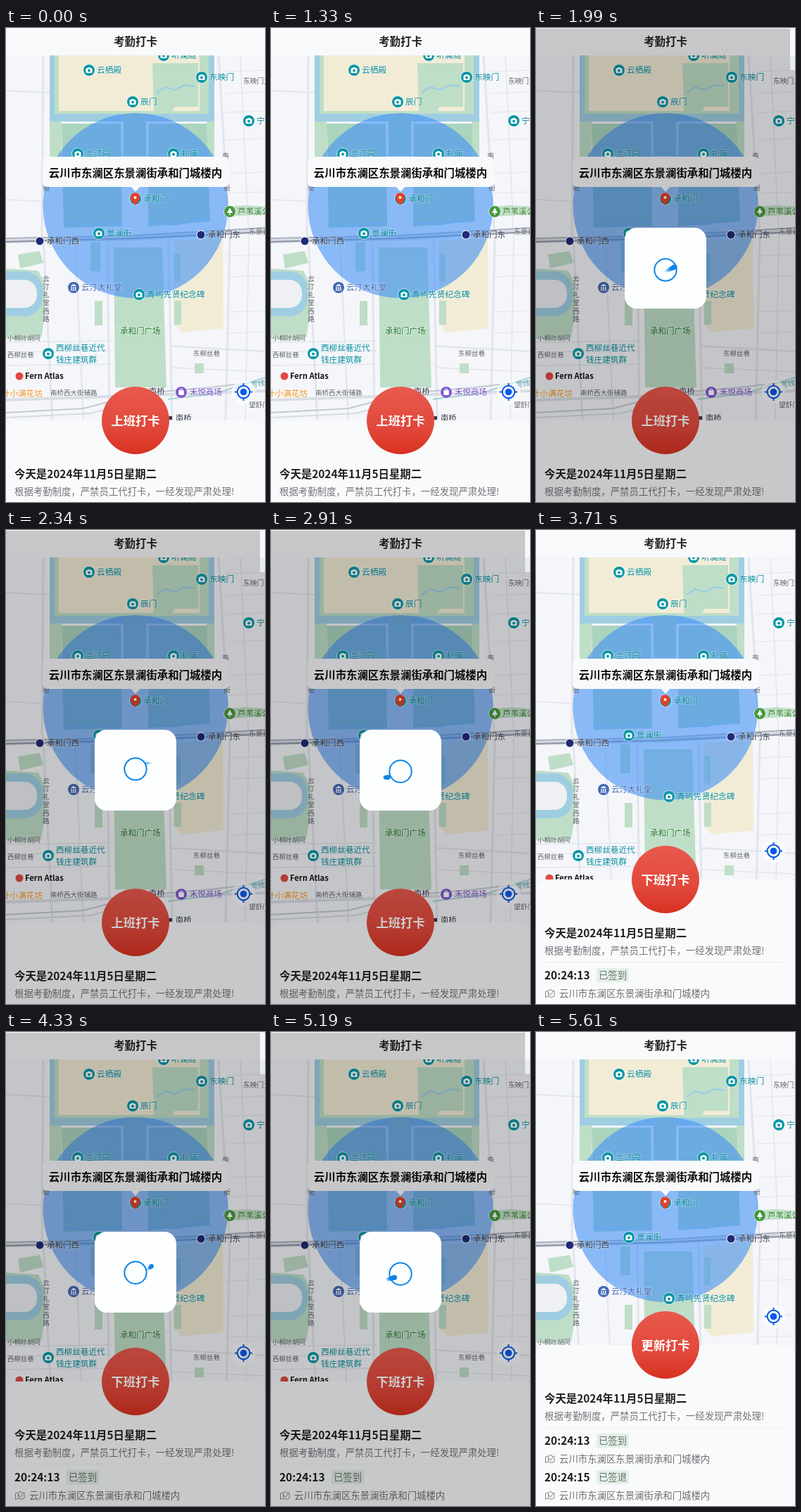
These frames come from a looping animation (368 px wide and 674 px high, 5.63 s). An HTML page with a canvas:

```html
<!DOCTYPE html>
<html lang="zh-CN">
<head>
<meta charset="utf-8">
<title>考勤打卡</title>
<style>
html, body { margin: 0; width: 100%; height: 100%; overflow: hidden; background: #f8f9fb; }
canvas { display: block; width: 368px; height: 674px; }
</style>
</head>
<body>
<canvas id="stage"></canvas>
<script>
const W = 368, H = 674, LOOP = 5630;
const canvas = document.getElementById('stage');
const ctx = canvas.getContext('2d');
const dpr = window.devicePixelRatio || 1;
canvas.width = W * dpr;
canvas.height = H * dpr;

const FONT = '"Noto Sans CJK SC", "Noto Sans CJK", "Noto Sans", sans-serif';
const ADDRESS = '云川市东澜区东景澜街承和门城楼内';
const TEAL = '#078c9c', GREEN = '#bfdec7', PARK = '#abd4bf', SAND = '#f2ecd6', WATER = '#9fcee2';
const ROAD = '#e2e5ec', GREY = '#5c6169';

// Each phase: start time, top edge of the sheet, button caption
const PHASES = [
  { at: 0, top: 558, label: '上班打卡' },
  { at: 2970, top: 497, label: '下班打卡' },
  { at: 5300, top: 445, label: '更新打卡' }
];
const RECORDS = [['20:24:13', '已签到'], ['20:24:15', '已签退']];
// Loading dialogs, with the comet's starting angle in degrees
const LOADS = [{ from: 1700, to: 2970, angle: 147 }, { from: 4330, to: 5300, angle: 14 }];

function rect(x0, y0, x1, y1, fill) {
  ctx.fillStyle = fill;
  ctx.fillRect(x0, y0, x1 - x0, y1 - y0);
}
function round(x, y, w, h, r, fill) {
  ctx.beginPath();
  ctx.roundRect(x, y, w, h, r);
  ctx.fillStyle = fill;
  ctx.fill();
}
function disc(x, y, r, fill) {
  ctx.beginPath();
  ctx.arc(x, y, r, 0, Math.PI * 2);
  ctx.fillStyle = fill;
  ctx.fill();
}
function ring(x, y, r, width, color) {
  ctx.beginPath();
  ctx.arc(x, y, r, 0, Math.PI * 2);
  ctx.strokeStyle = color;
  ctx.lineWidth = width;
  ctx.stroke();
}
function path(pts) {
  ctx.beginPath();
  for (let i = 0; i < pts.length; i += 2) ctx.lineTo(pts[i], pts[i + 1]);
}
function area(fill, ...pts) {
  path(pts);
  ctx.fillStyle = fill;
  ctx.fill();
}
function line(color, width, ...pts) {
  path(pts);
  ctx.strokeStyle = color;
  ctx.lineWidth = width;
  ctx.stroke();
}
function text(s, x, y, size, color, { weight = 400, align = 'left', halo = false } = {}) {
  ctx.font = `${weight} ${size}px ${FONT}`;
  ctx.textAlign = align;
  ctx.textBaseline = 'middle';
  if (halo) {
    ctx.strokeStyle = 'rgba(255,255,255,.3)';
    ctx.lineWidth = 2;
    ctx.lineJoin = 'round';
    ctx.strokeText(s, x, y);
  }
  ctx.fillStyle = color;
  ctx.fillText(s, x, y);
}
function column(s, x, y, step) {
  [...s].forEach((c, i) => text(c, x, y + i * step, 9.5, GREY, { align: 'center' }));
}

function badge(x, y, color) {
  disc(x, y, 9, 'rgba(255,255,255,.6)');
  disc(x, y, 8, color);
}
function sight(x, y, name) {
  badge(x, y, '#0a97a6');
  rect(x - 1.8, y - 4, x + 1.8, y - 2, '#fff');
  round(x - 4.5, y - 3, 9, 7, 1.5, '#fff');
  disc(x, y + .5, 2, '#0a97a6');
  text(name, x + 11, y, 11.8, TEAL, { weight: 500, halo: true });
}
function station(x, y, name) {
  disc(x, y, 6.5, '#fff');
  disc(x, y, 5.5, '#202a76');
  text(name, x + 10, y, 11.5, '#343a48', { weight: 500, halo: true });
}

function drawStreets() {
  line(ROAD, 2, 0, 89, 62, 92);
  line(ROAD, 1.5, 0, 244, 62, 247);
  line(ROAD, 3, 53, 39, 51, 300);
  line(ROAD, 3, 53, 300, 66, 558);
  line(ROAD, 2, 98, 300, 110, 558);
  line(ROAD, 3, 144, 300, 147, 558);
  line(ROAD, 3, 231, 300, 236, 558);
  line(ROAD, 3, 302, 39, 318, 300, 312, 558);
  line(ROAD, 1.5, 333, 39, 345, 300, 340, 558);
  for (const y of [60, 91, 118, 157, 205, 233, 322, 352, 402, 432]) line(ROAD, 1, 312, y + 2, W, y);
  for (const y of [445, 459, 478]) line(ROAD, 1.5, 0, y + 2, 150, y);
  line(ROAD, 2.5, 232, 452, W, 460);
  line(ROAD, 1.5, 236, 483, W, 489);
  line('#d9dde5', 4, 0, 529, 150, 524, W, 516);
}

function drawLand() {
  // Palace grounds inside the moat
  rect(62, 39, 296, 133, WATER);
  rect(69, 39, 288, 122, GREEN);
  rect(75, 39, 275, 118, SAND);
  area(GREEN, 208, 50, 273, 50, 273, 112, 240, 112, 236, 118, 210, 118);
  line(WATER, 2.5, 214, 92, 226, 84, 240, 88, 254, 81, 268, 83);

  // Twin parks, each with a canal along its foot
  rect(62, 133, 79, 185, GREEN);
  rect(285, 133, 296, 185, GREEN);
  area(PARK, 79, 136, 163, 136, 165, 282, 82, 284);
  area(PARK, 203, 136, 285, 136, 290, 275, 202, 282);
  rect(167, 122, 199, 182, PARK);
  line(WATER, 3, 81, 278, 120, 280, 165, 277);
  line(WATER, 3, 202, 277, 240, 279, 290, 270);

  // Central square
  area(GREEN, 153, 312, 222, 312, 228, 511, 155, 511);
  rect(120, 305, 134, 346, GREEN);
  rect(126, 388, 137, 423, GREEN);
  area(SAND, 238, 303, 308, 298, 309, 427, 250, 433, 238, 420);
  rect(239, 321, 248, 360, GREEN);
  rect(239, 388, 249, 422, GREEN);
  rect(268, 477, 281, 491, GREEN);
  line('#d4e9d8', 1, 156, 426, 227, 426);

  // Theatre lake
  area(GREEN, 17, 322, 48, 317, 53, 334, 20, 342);
  area(GREEN, 0, 342, 46, 345, 56, 365, 55, 410, 50, 440, 25, 445, 0, 441);
  round(-30, 346, 82, 64, 26, WATER);
  round(-30, 358, 74, 40, 18, '#eef0f4');

  area(GREEN, 316, 254, 340, 252, W, 254, W, 265, 316, 268);
}

function drawMap(top) {
  rect(0, 39, W, H, '#f5f6fa');
  ctx.save();
  ctx.beginPath();
  ctx.rect(0, 39, W, top - 39);
  ctx.clip();
  drawStreets();
  drawLand();

  // Avenue, metro and railway
  line('#d5d9e2', 8, 0, 302, 184, 298, W, 287);
  line('#a4abba', 1.5, 0, 299, 184, 295, W, 284);
  line('#8d93a5', 2, 0, 304, 184, 299, W, 290);
  line('#c3c9d2', 2, 0, 547, 110, 541, 190, 520, 290, 511, W, 502);
  line('#d6dae1', 2, 0, 554, 120, 548, 190, 530);
  line('#a4d3d7', 2, 230, 528, 300, 519, W, 497);

  disc(184, 252.5, 131.5, 'rgba(66,145,245,.6)');
  drawLabels();
  ctx.restore();
}

function drawLabels() {
  const small = { halo: true };
  sight(118, 60, '云栖殿');
  sight(224, 39, '听澜阁');
  sight(278, 70, '东映门');
  sight(180, 105, '辰门');
  sight(345, 132, '宁和寺');
  sight(102, 179, '兰汀园');
  sight(238, 179, '礼庙');
  sight(184, 243, '承和门');
  sight(132, 292, '景澜街');
  sight(189, 379, '青屿先贤纪念碑');
  sight(60, 463, '');
  text('西柳丝巷近代', 71, 455, 11.6, TEAL, { weight: 500, halo: true });
  text('钱庄建筑群', 71, 471.5, 11.6, TEAL, { weight: 500, halo: true });
  station(48, 303, '承和门西');
  station(277, 294, '承和门东');

  badge(96, 369, '#4467b5');
  area('#fff', 91.5, 367, 96, 364, 100.5, 367);
  for (const x of [92.5, 95.3, 98]) rect(x, 368, x + 1.4, 372, '#fff');
  rect(91.5, 372.5, 100.5, 373.5, '#fff');
  text('云汀大礼堂', 107, 369, 11.5, '#4467b5', { weight: 500, halo: true });

  badge(318, 261, '#479a3f');
  area('#fff', 318, 255.5, 322, 263, 314, 263);
  rect(317.3, 262, 318.7, 266, '#fff');
  text('芦苇溪公园', 329, 261, 11.5, '#38852f', { weight: 500, halo: true });
  text('承和门广场', 162, 431, 11.5, '#277b32', { weight: 500, halo: true });

  badge(249, 518, '#8059cf');
  round(245.2, 515, 7.6, 7, 1, '#fff');
  ctx.beginPath();
  ctx.arc(249, 515, 2, Math.PI, 0);
  ctx.strokeStyle = '#fff';
  ctx.lineWidth = 1;
  ctx.stroke();
  text('禾悦商场', 261, 518, 11.5, '#7650c5', { weight: 500, halo: true });
  text('叶小满花坊', -6, 519.5, 11.6, '#ef9422', { weight: 500, halo: true });

  text('东映门大街', 337, 75, 9.8, GREY, small);
  text('东景澜街', 345, 289, 9.8, GREY, small);
  text('小桐叶胡同', 2, 440, 9.4, GREY, small);
  text('西柳丝巷', 2, 464, 9.4, GREY, small);
  text('东柳丝巷', 266, 462, 9.5, GREY, small);
  text('南桥西大街辅路', 63, 518, 9.5, GREY, small);
  text('南桥', 203, 517, 11.3, '#343a48', small);
  text('南桥', 241, 555, 11.3, '#343a48', small);
  rect(231, 552, 236, 557, '#343a48');
  text('望舒门', 345, 535, 9.6, GREY, small);
  column('云汀礼堂西路', 57, 356, 11.5);
  column('街', 57, 227, 11);
  column('南', 312, 181, 11);
  column('街', 314, 227, 11);
  ctx.save();
  ctx.translate(348, 508);
  ctx.rotate(-.2);
  text('号线', 0, 0, 10, '#55a9ae');
  ctx.restore();

  disc(19, 495, 5.5, '#e04a43');
  text('Fern Atlas', 27, 495, 11.2, '#111', { weight: 700, halo: true });
}

function drawPopup() {
  round(52, 183, 265, 43, 7, '#f8f9fb');
  area('#f8f9fb', 177, 225, 191, 225, 184, 233);
  ctx.beginPath();
  ctx.arc(183.5, 241, 6.8, Math.PI * .86, Math.PI * .14);
  ctx.quadraticCurveTo(188, 248, 183.5, 252);
  ctx.quadraticCurveTo(179, 248, 177, 243.8);
  ctx.fillStyle = '#e4402b';
  ctx.fill();
  disc(183.5, 241, 2, '#fff');
  text(ADDRESS, 184, 206, 15.4, '#0c0c0c', { weight: 700, align: 'center' });
}

function drawLocate(y) {
  const x = 337.5, blue = '#0a59e8';
  disc(x, y, 17, 'rgba(255,255,255,.6)');
  ring(x, y, 8.8, 2, blue);
  disc(x, y, 4.8, blue);
  for (const [dx, dy] of [[1, 0], [-1, 0], [0, 1], [0, -1]])
    line(blue, 2, x + dx * 9, y + dy * 9, x + dx * 12.5, y + dy * 12.5);
}

function drawRecord([time, state], y) {
  text(time, 12, y, 15.4, '#1c1c1e', { weight: 700 });
  rect(86, y - 10, 132, y + 10, '#e3f0e7');
  text(state, 109, y, 13.4, '#6d7370', { align: 'center' });
  const c = '#85878b', p = y + 26;
  line(c, 1, 17, p - 4, 13.5, p - 3, 13.5, p + 5.5, 17.5, p + 4, 22, p + 5.5, 26, p + 4, 26, p - 4, 24, p - 3.5);
  line(c, 1, 17.5, p - 3, 17.5, p + 4);
  ctx.beginPath();
  ctx.arc(20.5, p - 2.5, 3, Math.PI * .8, Math.PI * .2);
  ctx.lineTo(20.5, p + 2.5);
  ctx.closePath();
  ctx.stroke();
  text(ADDRESS, 33, p, 13.4, '#6f7175');
}

function drawSheet(phase, count) {
  const top = phase.top;
  round(0, top, W, H, [18, 18, 0, 0], '#f9fafb');
  const g = ctx.createLinearGradient(0, top - 48, 0, top + 48);
  g.addColorStop(0, '#e9594d');
  g.addColorStop(.6, '#e1493c');
  g.addColorStop(1, '#d83120');
  disc(184, top, 48, g);
  text(phase.label, 184, top, 17.3, '#fff', { weight: 700, align: 'center' });
  text('今天是2024年11月5日星期二', 12, top + 76, 15.4, '#1f2022', { weight: 700 });
  text('根据考勤制度，严禁员工代打卡，一经发现严肃处理!', 12, top + 101, 13.4, '#737579');
  if (count) rect(12, top + 117, 352, top + 118, '#eeeff1');
  for (let i = 0; i < count; i++) drawRecord(RECORDS[i], top + 136 + i * 52);
}

// Point on the comet's tilted orbit
function orbit(a) {
  const tilt = -.4, u = 25 * Math.cos(a), v = 4 * Math.sin(a);
  return [184 + u * Math.cos(tilt) - v * Math.sin(tilt), 341.5 + u * Math.sin(tilt) + v * Math.cos(tilt)];
}
function drawComet(a) {
  const near = Math.sin(a) > -.1, depth = (1 + Math.sin(a)) / 2;
  for (let i = 14; i >= 0; i--) {
    const k = 1 - i / 15;
    const [x, y] = orbit(a + i * .05);
    ctx.globalAlpha = near ? k * k : k * k * .22;
    disc(x, y, (1.9 + 1.8 * depth) * (.55 + .45 * k), '#0a84e8');
  }
  ctx.globalAlpha = 1;
}
function drawLoading(load, t) {
  rect(0, 1, W, H, 'rgba(0,0,0,.2)');
  rect(361, 0, W, 39, '#f7f8fa');
  rect(361, 39, W, 60, '#e6ebf4');
  round(126, 284, 116, 115, 17, '#fdfefe');
  const a = (load.angle - (t - load.from) * .3) * Math.PI / 180;
  const near = Math.sin(a) > 0;
  if (!near) drawComet(a);
  ring(184, 341.7 + 2.6 * Math.sin(a), 15.7, 2, '#0a84e8');
  if (near) drawComet(a);
}

function draw(t) {
  const n = PHASES.filter(p => t >= p.at).length - 1;
  const phase = PHASES[n];
  ctx.setTransform(dpr, 0, 0, dpr, 0, 0);
  drawMap(phase.top);
  rect(0, 0, W, 39, '#f8f9fb');
  text('考勤打卡', 184, 19.5, 15.4, '#1f2022', { weight: 700, align: 'center' });
  drawPopup();
  drawLocate(phase.top - 40.5);
  drawSheet(phase, n);
  const load = LOADS.find(l => t >= l.from && t < l.to);
  if (load) drawLoading(load, t);
}

const start = performance.now();
function tick() {
  draw((performance.now() - start) % LOOP);
  requestAnimationFrame(tick);
}
tick();
</script>
</body>
</html>
```
